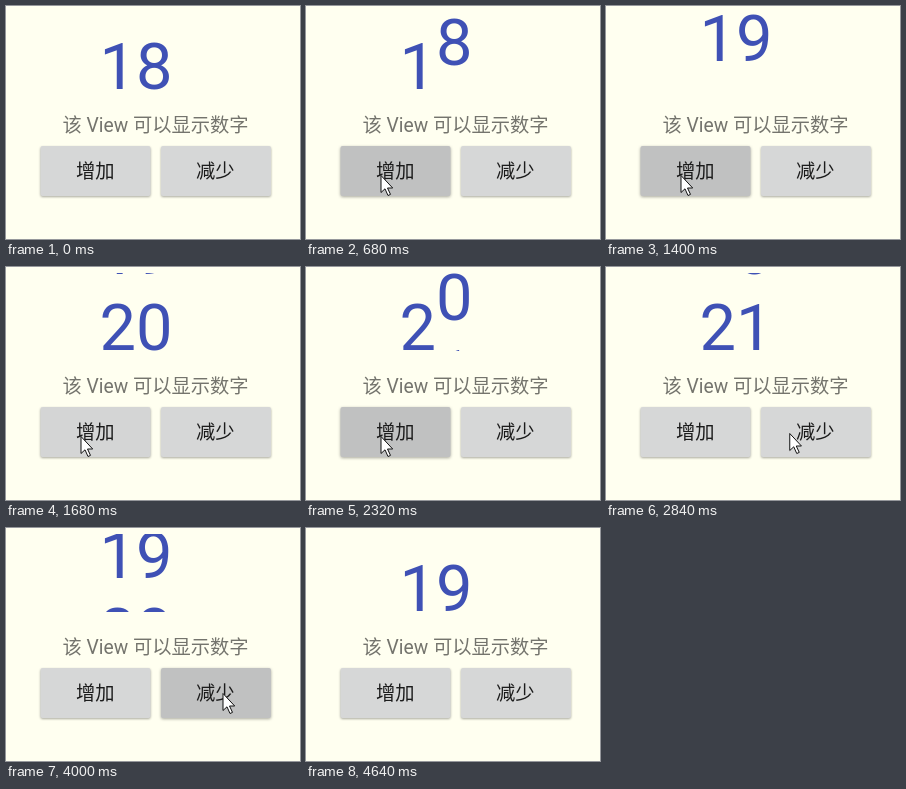
Recreate the animation shown at these times as an HTML page. Size 294 px wide and 233 px high, loop 4680 ms.

```html
<!DOCTYPE html>
<html lang="zh-CN">
<head>
<meta charset="utf-8">
<title>数字滚动</title>
<style>
  html, body { margin: 0; width: 100%; height: 100%; overflow: hidden; background: #fffff0; }
  svg { display: block; width: 294px; height: 233px; }
  text { font: 19.3px Roboto, "Noto Sans CJK SC", "Noto Sans CJK", "Noto Sans CJK JP", sans-serif; }
  .digit { font-size: 65px; fill: #3f51b5; }
  .hint { fill: #74746d; }
  .label { fill: #1c1c1c; }
  .face { fill: #d6d7d7; }
</style>
</head>
<body>
<svg viewBox="0 0 294 233">
  <clipPath id="window"><rect x="90" y="6" width="84" height="78"/></clipPath>
  <g clip-path="url(#window)">
    <text class="digit" x="93.5"></text>
    <text class="digit" x="93.5"></text>
    <text class="digit" x="130"></text>
    <text class="digit" x="130"></text>
  </g>
  <text class="hint" x="56.4" y="126">该 View 可以显示数字</text>
  <g class="button">
    <rect class="face" x="34.5" y="140" width="110" height="50" rx="2"/>
    <rect class="ink" x="34.5" y="140" width="110" height="50" rx="2"/>
    <text class="label" x="70" y="172">增加</text>
  </g>
  <g class="button">
    <rect class="face" x="155" y="140" width="110" height="50" rx="2"/>
    <rect class="ink" x="155" y="140" width="110" height="50" rx="2"/>
    <text class="label" x="190" y="172">减少</text>
  </g>
  <path id="cursor" d="M.5 .5V17.5L4.5 13.8L7.5 20.5L10 19.4L7 13H12.2Z"
        fill="#fff" stroke="#111" stroke-linejoin="round"/>
</svg>
<script>
const LOOP = 4680, TICK = 40, PITCH = 76, BASELINE = 83, ROLL = 300;

// press time, roll start, old value, new value, button index
const clicks = [
  [560, 565, 18, 19, 0],
  [1240, 1275, 19, 20, 0],
  [2160, 2190, 20, 21, 0],
  [3160, 3217, 21, 20, 1],
  [3760, 3837, 20, 19, 1]
];

// time, x, y of the pointer tip
const pointer = [
  [80, 282, 56], [160, 175, 104], [240, 74, 152], [280, 47, 162],
  [320, 70, 168], [360, 74.5, 169], [2720, 74.5, 169], [2800, 150, 167],
  [2880, 216.5, 165], [4560, 216.5, 165], [4600, 250, 119]
];

const digits = document.querySelectorAll('.digit');
const buttons = document.querySelectorAll('.button');
const cursor = document.getElementById('cursor');
const clamp = v => Math.min(1, Math.max(0, v));
const ease = p => (1 - Math.cos(Math.PI * p)) / 2;

function place(el, char, shift) {
  el.textContent = char;
  el.setAttribute('y', BASELINE + shift);
}

function drawNumber(t) {
  const [, start, from, to] = clicks.filter(c => t >= c[0]).pop() || [0, 0, 18, 18];
  const p = ease(clamp((t - start) / ROLL));
  const dir = to >= from ? 1 : -1;
  for (let i = 0; i < 2; i++) {
    const before = String(from)[i], after = String(to)[i];
    const same = before === after;
    place(digits[2 * i], same ? '' : before, -dir * PITCH * p);
    place(digits[2 * i + 1], after, same ? 0 : dir * PITCH * (1 - p));
  }
}

function drawButtons(t) {
  buttons.forEach((button, i) => {
    let press = 0;
    for (const c of clicks) {
      if (c[4] !== i) continue;
      const age = t - c[0];
      press = Math.max(press, Math.min(clamp((age + TICK) / 100), clamp((450 - age) / 140)));
    }
    button.querySelector('.ink').setAttribute('opacity', 0.1 * press);
    button.querySelector('.face').style.filter =
      `drop-shadow(0 ${1 + press * 0.7}px ${1.1 + press * 0.7}px rgba(0,0,0,.34))`;
  });
}

function drawCursor(t) {
  const next = pointer.findIndex(k => k[0] >= t);
  const shown = t >= pointer[0][0] && next >= 0;
  cursor.setAttribute('visibility', shown ? 'visible' : 'hidden');
  if (!shown) return;
  const b = pointer[next], a = pointer[Math.max(0, next - 1)];
  const p = a === b ? 1 : (t - a[0]) / (b[0] - a[0]);
  const mix = k => a[k] + (b[k] - a[k]) * p;
  cursor.setAttribute('transform', `translate(${mix(1)} ${mix(2)})`);
}

const origin = performance.now();
function draw() {
  const now = Math.max(0, performance.now() - origin) % LOOP;
  const t = Math.floor(now / TICK) * TICK;
  drawNumber(t);
  drawButtons(t);
  drawCursor(t);
  requestAnimationFrame(draw);
}
draw();
</script>
</body>
</html>
```
